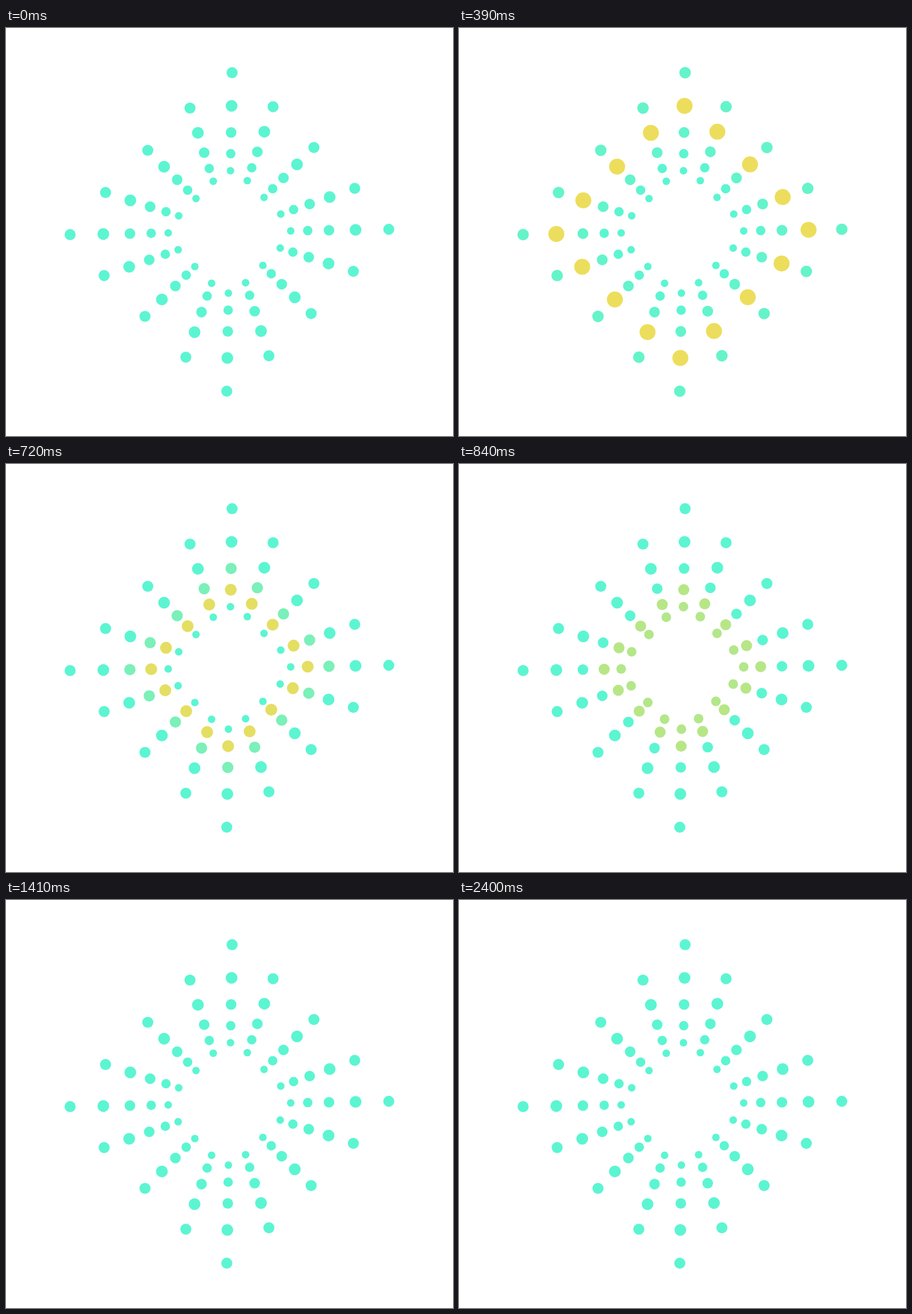
An HTML page with a canvas that plays this animation: 783x715 px, repeating every 2.43 s.

```html
<!DOCTYPE html>
<html>
<head>
<meta charset="utf-8">
<style>
html, body { margin: 0; height: 100%; overflow: hidden; background: #fff; }
canvas { display: block; }
</style>
</head>
<body>
<canvas width="783" height="715"></canvas>
<script>
const ctx = document.querySelector('canvas').getContext('2d');
const LOOP = 2430, STAGGER = 180, PULSE = 426;
const CENTER = [391.4, 357.4];
const SKEW = 0.0167, CORNER_INSET = 11.9;
const REST = [92, 245, 210], LIT = [236, 222, 92];

// Outermost ring first: resting dot radius and growth at the peak
const rings = [[9.7, 5.7], [10.3, 3.7], [9.3, 2.8], [8.25, 2.3], [6.6, 3]]
  .map(([rest, growth], i) => ({ rest, growth, size: 291 * 0.8 ** i, delay: i * STAGGER }));

const mix = (a, b, k) => a + (b - a) * k;

// Corners of a slightly skewed diamond: top, right, bottom, left
const corners = r => [[SKEW * r, -r], [r, -SKEW * r], [-SKEW * r, r], [-r, SKEW * r]];

function ringPoints(size) {
  const outer = corners(size), inset = corners(size - CORNER_INSET);
  return outer.flatMap((a, i) => {
    const b = outer[(i + 1) % 4];
    const side = [0.25, 0.5, 0.75].map(k => [mix(a[0], b[0], k), mix(a[1], b[1], k)]);
    return [inset[i], ...side];
  });
}

function pulse(t) {
  return t > 0 && t < PULSE ? Math.sin(Math.PI * t / PULSE) ** 2 : 0;
}

function draw(now) {
  const t = now % LOOP;
  ctx.fillStyle = '#fff';
  ctx.fillRect(0, 0, 783, 715);
  for (const { rest, growth, size, delay } of rings) {
    const level = pulse(t - delay);
    ctx.fillStyle = `rgb(${REST.map((c, i) => Math.round(mix(c, LIT[i], level)))})`;
    for (const [x, y] of ringPoints(size)) {
      ctx.beginPath();
      ctx.arc(CENTER[0] + x, CENTER[1] + y, rest + growth * level, 0, 2 * Math.PI);
      ctx.fill();
    }
  }
}

const start = performance.now();
function frame() {
  draw(performance.now() - start);
  requestAnimationFrame(frame);
}
frame();
</script>
</body>
</html>
```
